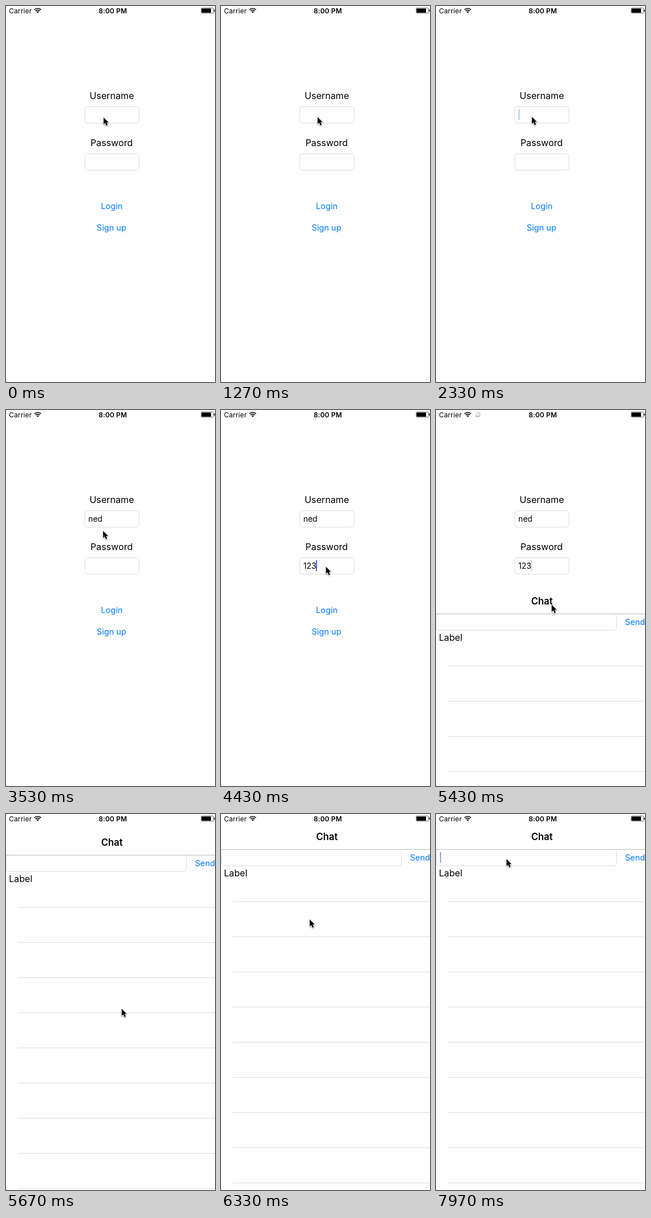
Recreate the animation shown at these times as an HTML page. Size 370 px wide and 663 px high, loop 8 s.

```html
<!DOCTYPE html>
<html lang="en">
<head>
<meta charset="utf-8">
<title>Login to chat</title>
<style>
  html, body { margin: 0; width: 100%; height: 100%; overflow: hidden; background: #fefefe; }
  svg { display: block; }
  text { font-family: Inter, "Open Sans", sans-serif; white-space: pre; }
  .label { font-size: 16.2px; }
  .title { font-size: 16.8px; font-weight: 600; }
  .link { font-size: 14.7px; fill: #007aff; }
  .typed { font-size: 14px; }
  .status { font-size: 12px; letter-spacing: .15px; }
  .mid { text-anchor: middle; }
  .field { fill: #fefefe; stroke: #dedede; }
  .caret { fill: #426be8; }
  .wire { fill: none; stroke: #000; stroke-width: 1.6; }
</style>
</head>
<body>
<svg width="370" height="663" viewBox="0 0 370 663">
  <rect width="370" height="663" fill="#fefefe"/>

  <text class="label mid" x="187.4" y="164.3">Username</text>
  <rect class="field" x="139.5" y="177.5" width="96" height="29" rx="4.5"/>
  <text class="typed" id="name" x="145.7" y="196.5"></text>
  <rect class="caret" id="nameCaret" y="182" width="2" height="19"/>

  <text class="label mid" x="187" y="247.3">Password</text>
  <rect class="field" x="139.5" y="260.5" width="96" height="29" rx="4.5"/>
  <text class="typed" id="pass" x="145.7" y="279.5"></text>
  <rect class="caret" id="passCaret" y="265" width="2" height="19"/>

  <text class="link mid" x="187.2" y="357.5">Login</text>
  <text class="link mid" x="186.8" y="395.7">Sign up</text>

  <g id="sheet">
    <rect width="370" height="663" fill="#fefefe"/>
    <text class="title mid" x="187.5" y="46">Chat</text>
    <rect class="field" x=".5" y="62.5" width="319" height="29" rx="4.5"/>
    <path d="M0 62.5H370" stroke="#bcbcbc"/>
    <rect class="caret" id="chatCaret" x="7" y="67" width="2" height="19"/>
    <text class="link" x="334.4" y="81.5">Send</text>
    <text class="label" x="5.2" y="109.5">Label</text>
    <path id="rows" stroke="#dedee0"/>
  </g>

  <text class="status" x="5.3" y="12.6">Carrier</text>
  <path class="wire" d="M50.4 6.6a8.2 8.2 0 0 1 11.6 0M52.5 8.9a5.2 5.2 0 0 1 7.4 0"/>
  <path d="M54.2 10.6a2.8 2.8 0 0 1 4 0l-2 2z"/>
  <g id="spinner"></g>
  <text class="status mid" x="189" y="12.6" font-weight="600">8:00 PM</text>
  <rect x="345.5" y="3.5" width="22" height="9" rx="1.5" fill="none" stroke="#555" stroke-width=".8"/>
  <rect x="346.3" y="4.4" width="16.7" height="7.3" rx=".6"/>
  <rect x="368.4" y="6.3" width="1.4" height="3.5" rx=".6"/>
  <rect y="662" width="1" height="1" fill="#aaa"/>

  <path id="mouse" d="M.8 1V13.2L3.6 10.7 5.7 15.5 8 14.5 6 9.8H9.7Z"
    stroke="#fff" stroke-width="1.6" paint-order="stroke" stroke-linejoin="round"
    style="filter:drop-shadow(0 1px 1px rgba(0,0,0,.4))"/>
</svg>
<script>
const LOOP = 8000;
const $ = id => document.getElementById(id);
const set = (id, name, value) => $(id).setAttribute(name, value);
const repeat = (n, make) => Array.from({ length: n }, (_, i) => make(i)).join('');
const ramp = (t, from, to) => Math.min(1, Math.max(0, (t - from) / (to - from)));
const smooth = u => u * u * (3 - 2 * u);

const inputs = [
  { id: 'name', word: 'ned', focus: 270, typeAt: 2450, step: 125, blur: 4140 },
  { id: 'pass', word: '123', focus: 4160, typeAt: 4230, step: 80, blur: LOOP }
];
const mouseStart = { x: 172, y: 195.5 };
const mouseMoves = [
  { from: 270, to: 2030, x: 169, y: 194.5 },
  { from: 3360, to: 3900, x: 178, y: 270 },
  { from: 4140, to: 4260, x: 185, y: 275.5 },
  { from: 4500, to: 4890, x: 204, y: 342.5 },
  { from: 5850, to: 6700, x: 124, y: 78.5 }
];

set('rows', 'd', repeat(9, i => `M21 ${154.5 + 62 * i}H370`));
$('spinner').innerHTML = repeat(8, i =>
  `<path d="M0 -2.2V-5" stroke="#444" stroke-width="1.1" opacity="${.2 + i * .1}" transform="rotate(${i * 45})"/>`);

// Caret opacity: solid, fades out, then fades back in once a second.
function blink(age) {
  const p = age % 1000;
  const fadeIn = age < 1000 ? 1 : ramp(p, 0, 150);
  return fadeIn - ramp(p, 630, 770);
}

function drawInput({ id, word, focus, typeAt, step, blur }, t) {
  const count = Math.min(word.length, Math.max(0, Math.floor((t - typeAt) / step) + 1));
  const lastKey = count ? typeAt + (count - 1) * step : focus;
  const caret = id + 'Caret';
  $(id).textContent = word.slice(0, count);
  set(caret, 'x', Math.round(145.6 + $(id).getComputedTextLength() - (count ? .8 : 0)));
  set(caret, 'opacity', t >= focus && t < blur ? blink(t - lastKey) : 0);
}

// Critically damped spring carrying the sheet up from the bottom edge.
function sheetOffset(t) {
  const s = Math.max(0, t - 5327) * .01795;
  return Math.round(663 * (1 + s) * Math.exp(-s));
}

function mouseAt(t) {
  let { x, y } = mouseStart;
  for (const m of mouseMoves) {
    const u = smooth(ramp(t, m.from, m.to));
    x += (m.x - x) * u;
    y += (m.y - y) * u;
  }
  return `translate(${x} ${y})`;
}

function draw() {
  const t = Math.round(performance.now() % LOOP / 10) * 10;
  inputs.forEach(input => drawInput(input, t));
  set('chatCaret', 'opacity', t >= 7090 ? blink(t - 6880) : 0);
  set('sheet', 'transform', `translate(0 ${sheetOffset(t)})`);
  set('spinner', 'transform', `translate(74 8) rotate(${Math.floor(t / 100) * 45})`);
  set('spinner', 'opacity', t >= 4950 && t < 5640 ? 1 : 0);
  set('mouse', 'transform', mouseAt(t));
  requestAnimationFrame(draw);
}
draw();
</script>
</body>
</html>
```
